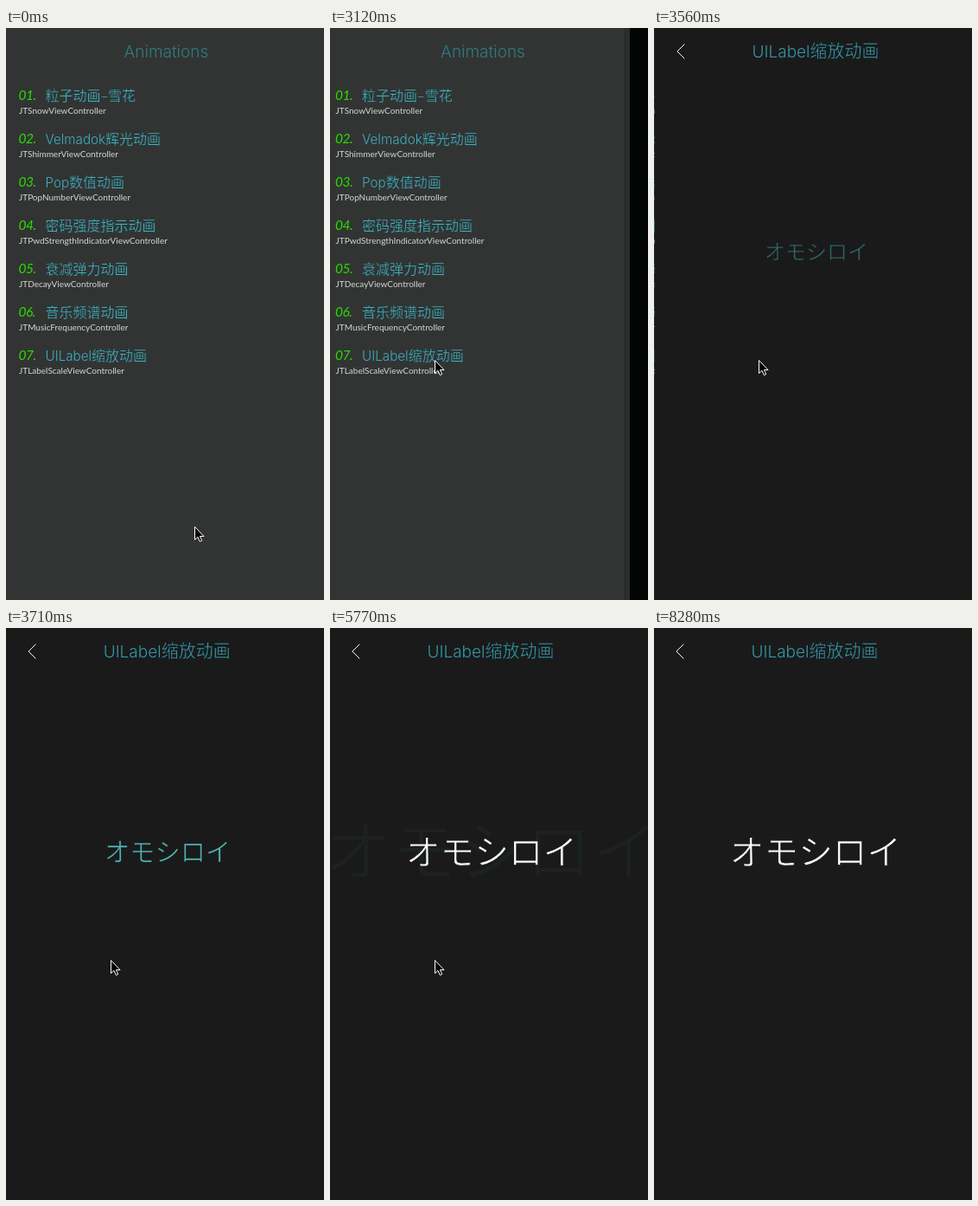
An HTML page for the animation above (9.66 s loop, 368 by 660 pixels).

```html
<!DOCTYPE html>
<html lang="zh-CN">
<head>
<meta charset="utf-8">
<title>Animations</title>
<style>
  html, body { margin: 0; width: 100%; height: 100%; overflow: hidden; background: #1a1a1a; }
  svg { display: block; width: 368px; height: 660px; }
  text { font-family: "Noto Sans CJK SC", "Noto Sans CJK JP", sans-serif; font-weight: 300; white-space: pre; }
  .latin { font-family: Inter, sans-serif; font-size: .95em; stroke: none; }
  /* A stroke in the backdrop colour thins the CJK glyphs */
  .bar { font-size: 20px; fill: #3497a8; stroke: #1a1a1a; stroke-width: .4; }
  .name { font-size: 16px; fill: #3bb0c1; stroke: #323433; stroke-width: .25; }
  .num { font: italic 400 15.5px Lato, sans-serif; letter-spacing: -.5px; fill: #2bdc00; }
  .sub { font: 400 10px Lato, sans-serif; fill: #d6d8d7; }
  .kana { font-family: "Noto Sans CJK JP", "Noto Sans CJK SC", sans-serif; font-size: 39.7px; text-anchor: middle;
          stroke: #1a1a1a; stroke-width: .9; }
</style>
</head>
<body>
<svg viewBox="0 0 368 660">
  <defs>
    <linearGradient id="shine" gradientUnits="userSpaceOnUse" x1="-72" x2="72" y1="0" y2="0">
      <stop offset="0" stop-color="#2d7c81"/>
      <stop offset=".5" stop-color="#35bccb"/>
      <stop offset="1" stop-color="#2d7c81"/>
    </linearGradient>
  </defs>

  <rect width="368" height="660" fill="#323433"/>
  <g id="list">
    <text class="bar" x="136.500" y="34" style="fill:url(#shine)"><tspan class="latin">Animations</tspan></text>
    <g id="rows"></g>
  </g>
  <rect id="dim" width="368" height="660"/>

  <g id="page">
    <rect x="-7" width="7" height="660" fill-opacity=".14"/>
    <rect width="368" height="660" fill="#000202" fill-opacity=".94"/>
    <rect id="back" width="368" height="660" fill="#1a1a1a"/>
    <path d="M34.300 18.700L25.900 27l8.400 8.300" fill="none" stroke="#fff"/>
    <text class="bar" x="112.500" y="34"><tspan class="latin">UILabel</tspan>缩放动画</text>
    <text class="kana" id="echo" y="14.500" style="fill:#4fb5b8">オモシロイ</text>
    <text class="kana" id="word" y="14.500">オモシロイ</text>
  </g>

  <path id="cursor" d="M.5.5V15.500L4 12.300 6.300 17.500 8.700 16.500 6.400 11.500H11Z"
        fill="#000" stroke="#fff"/>
</svg>
<script>
const LOOP = 9660, STEP = 147.85;
const $ = id => document.getElementById(id);
const clamp = v => Math.min(1, Math.max(0, v));
const mix = (a, b, p) => a + (b - a) * p;
const move = (id, x, y = 0, s = 1) =>
  $(id).setAttribute('transform', `translate(${x} ${y}) scale(${s})`);
const latin = s => s.replace(/[A-Za-z]+/, '<tspan class="latin">$&</tspan>');

const items = [
  ['粒子动画–雪花', 'JTSnowViewController'],
  ['Velmadok辉光动画', 'JTShimmerViewController'],
  ['Pop数值动画', 'JTPopNumberViewController'],
  ['密码强度指示动画', 'JTPwdStrengthIndicatorViewController'],
  ['衰减弹力动画', 'JTDecayViewController'],
  ['音乐频谱动画', 'JTMusicFrequencyController'],
  ['UILabel缩放动画', 'JTLabelScaleViewController']
];
$('rows').innerHTML = items.map(([name, sub], i) => `
  <g transform="translate(0 ${i * 50})">
    <text class="num" x="14.500" y="83">0${i + 1}.</text>
    <text class="name" x="45.500" y="83.500">${latin(name)}</text>
    <text class="sub" x="15" y="98.500">${sub}</text>
  </g>`).join('');

// Pointer route: step, x, y
const route = [
  [0, 218, 575], [1, 218, 575], [3, 217, 577], [4, 217, 577], [6, 215, 571], [7, 215, 571],
  [11, 205, 598], [13, 204, 597], [14, 190, 520], [15, 158, 393], [17, 121, 383],
  [44, 121, 383], [48, 165, 470], [52, 249, 560], [55, 277, 640], [56, 277, 680], [66, 277, 680]
];

function pointer(k) {
  const i = route.findIndex(p => p[0] > k);
  const [a, b] = [route[i - 1], route[i]];
  const p = (k - a[0]) / (b[0] - a[0]);
  return [mix(a[1], b[1], p), mix(a[2], b[2], p)];
}

function draw(k) {
  move('cursor', ...pointer(k));
  $('shine').setAttribute('gradientTransform', `translate(${211 + (k - 12) * STEP * .23})`);

  // Push transition: the page closes in exponentially, the list drifts behind it
  const open = k >= 21;
  const x = open ? 347 * .144 ** (k - 21) : 400;
  move('page', x);
  move('back', k > 23 ? 0 : x * 4.56);
  move('list', open ? -.3 * (375 - x) : 0);
  $('dim').style.opacity = open ? .1 * (1 - x / 368) : 0;

  // Word grows in teal, then turns white
  const white = clamp((k - 28) / 3);
  const rgb = [77, 178, 180].map(c => Math.round(mix(c, 255, white)));
  move('word', 187, 258.500, mix(.474, 1, clamp((k - 23) / 4)));
  $('word').style.opacity = clamp((k - 23) / 2);
  $('word').style.fill = `rgb(${rgb})`;

  // Echo expands and fades
  const q = clamp((k - 34) / 5);
  move('echo', 187, 258, 1 + .95 * (1 - (1 - q) ** 2));
  $('echo').style.opacity = k > 34 && k < 45 ? .05 + .5 * (1 - q) : 0;
}

const start = performance.now();
function tick() {
  const t = (performance.now() - start) % LOOP;
  draw(Math.floor(t / STEP));
  requestAnimationFrame(tick);
}
tick();
</script>
</body>
</html>
```
